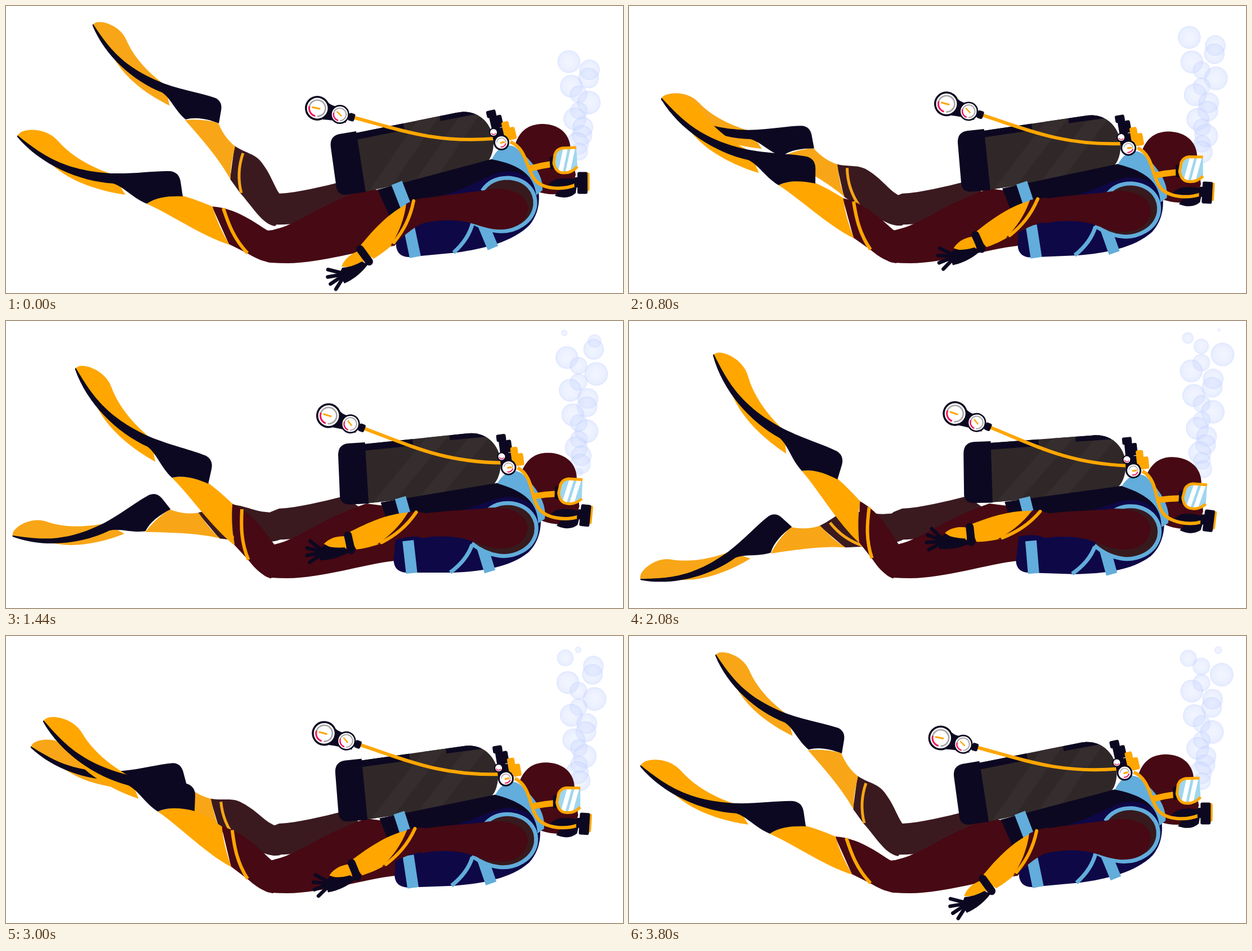
An HTML page with a canvas that plays this animation: 1096x511 px, repeating every 3.84 s.

```html
<!DOCTYPE html>
<html lang="en">
<head>
<meta charset="utf-8">
<title>Diver</title>
<style>
html, body { margin: 0; width: 100%; height: 100%; overflow: hidden; background: #fff; }
canvas { display: block; width: 100%; height: 100%; }
</style>
</head>
<body>
<canvas id="stage" width="1096" height="511"></canvas>
<script>
const ctx = document.getElementById('stage').getContext('2d');
const LOOP = 3840, PEAK = 1980, STEP = 40, RAD = Math.PI / 180;
const YELLOW = '#ffa600', INK = '#0d0821', SUIT = '#470914', FAR_SUIT = '#3b1a1f',
  FAR_YELLOW = '#f8a617', NAVY = '#0e0847', BLUE = '#62addb', GREY = '#aaa5a5', RED = '#f0175c';

const cache = {};
const path = d => cache[d] || (cache[d] = new Path2D(d));
function fill(color, d) {
  ctx.fillStyle = color;
  ctx.fill(path(d));
}
function line(color, width, d) {
  ctx.strokeStyle = color;
  ctx.lineWidth = width;
  ctx.stroke(path(d));
}
function disc(color, x, y, r) {
  ctx.fillStyle = color;
  ctx.beginPath();
  ctx.arc(x, y, r, 0, Math.PI * 2);
  ctx.fill();
}
function arc(color, width, x, y, r, from, to) {
  ctx.strokeStyle = color;
  ctx.lineWidth = width;
  ctx.beginPath();
  ctx.arc(x, y, r, from * RAD, to * RAD);
  ctx.stroke();
}
function turned(x, y, degrees, draw, scale = 1) {
  ctx.save();
  ctx.translate(x, y);
  ctx.rotate(degrees * RAD);
  ctx.scale(scale, scale);
  ctx.translate(-x, -y);
  draw();
  ctx.restore();
}
function clipped(d, draw) {
  ctx.save();
  ctx.clip(path(d));
  draw();
  ctx.restore();
}
function block(color, x, y, w, h, tilt = 0) {
  turned(x, y, tilt, () => {
    ctx.fillStyle = color;
    ctx.beginPath();
    ctx.roundRect(x - w / 2, y - h / 2, w, h, 3);
    ctx.fill();
  });
}

// One bubble every quarter second or so; each rises evenly and drifts to its side.
function bubbles(seconds) {
  const every = .27, speed = 54;
  for (let i = -12; i * every < seconds; i++) {
    const age = seconds - i * every;
    const side = Math.cos(i * 2 * Math.PI / 3.5);
    const x = 1018 + (5 + 28 * side) * age / 3.6;
    const y = 274 - speed * age;
    const size = Math.min(1, age / .25, (y - 10) / 40);
    if (size <= 0) continue;
    const r = (14 + 7 * Math.abs(side)) * size;
    const shade = ctx.createRadialGradient(x, y, r * .2, x, y, r);
    shade.addColorStop(0, 'rgba(212,223,255,.34)');
    shade.addColorStop(.75, 'rgba(203,216,255,.4)');
    shade.addColorStop(1, 'rgba(188,204,255,.48)');
    disc(shade, x, y, r);
  }
}

// Both legs wear the same fin, drawn with its tip at the origin.
function fin(x, y, tilt, scale, color) {
  ctx.save();
  ctx.translate(x, y);
  turned(0, 0, tilt, () => {
    fill(color, 'M0,0C3,-14 49,-17 71,9C99,41 139,59 169,69L191,105C149,99 109,86 79,66C49,44 19,19 0,0Z');
    fill(INK, 'M-1,-1C41,32 79,62 167,67C209,68 244,62 271,63Q286,65 289,81L293,108C269,107 247,109 229,121C204,111 189,91 169,85C109,81 41,52 -1,2Z');
  }, scale);
  ctx.restore();
}
function farShin() {
  fill(FAR_SUIT, 'M406,249C425,262 440,262 452,276C470,298 475,318 485,333L505,360L478,392C455,388 440,360 416,333L398,308Z');
  fill(FAR_YELLOW, 'M318,203C340,201 358,203 377,208C385,228 395,240 407,250C403,268 398,290 399,309C380,275 355,245 318,203Z');
  line(FAR_YELLOW, 5, 'M421,262C413,285 412,310 418,333');
  fin(155, 33, 18, .91, FAR_YELLOW);
}
function nearShin() {
  fill(SUIT, 'M366,357C410,360 440,385 467,401L490,430L478,457C460,457 445,450 430,441L396,424Z');
  fill(YELLOW, 'M250,352C268,340 290,337 314,338C335,344 350,350 367,357C373,380 385,405 397,425C345,408 300,375 250,352Z');
  line(YELLOW, 6, 'M386,360C395,388 405,415 429,440');
  fin(21, 231, 0, 1, YELLOW);
}

function tank() {
  const shell = 'M622,226L800,190C835,182 862,205 866,238C867,265 858,281 840,287L636,331Z';
  fill('#302828', shell);
  clipped(shell, () => {
    line('#352d2e', 28, 'M760,185L655,340M840,170L735,325');
    line(INK, 20, 'M622,228L706,211M770,195L832,183');
  });
  fill(INK, 'M592,228L622,223L639,331L604,336Q590,337 587,324L577,252Q574,232 592,228Z');
}

function dial(x, y, r) {
  disc(INK, x, y, r);
  disc('#fff', x, y, r * .84);
  arc(GREY, r * .12, x, y, r * .66, 190, 450);
  arc(RED, r * .14, x, y, r * .66, 105, 195);
  turned(x, y, r < 20 ? 45 : 12, () => line(YELLOW, r * .14, `M${x - r * .45},${y}L${x + r * .25},${y}`));
}

function gear() {
  line(YELLOW, 6, 'M612,197C700,220 760,245 868,236');
  fill(INK, 'M565,165Q580,183 596,177L604,208Q580,203 562,202Z');
  block(INK, 614, 198, 11, 14, 15);
  dial(553, 182, 22);
  dial(593, 193, 17);

  block(INK, 862, 192, 17, 13, -13);
  block(INK, 868, 208, 15, 24, -13);
  block(INK, 877, 205, 10, 22, -13);
  block(INK, 876, 229, 24, 23, -10);
  block(YELLOW, 889, 220, 13, 29, -13);
  block(YELLOW, 898, 227, 15, 22, -13);
  disc(INK, 866, 225, 8);
  disc('#fff', 866, 225, 6);
  arc(RED, 1.5, 866, 225, 4, 20, 160);
  disc(INK, 880, 243, 14);
  disc('#fff', 880, 243, 11);
  arc(GREY, 1.5, 880, 243, 8, 180, 360);
  arc(RED, 2, 880, 243, 8, 10, 100);
  line(YELLOW, 3, 'M878,244L886,242');
}

function head() {
  fill(SUIT, 'M905,245C915,216 935,210 955,210C985,211 1003,230 1003,257L1012,300L1005,330C980,338 960,336 942,330C935,300 920,265 905,245Z');
  fill(INK, 'M976,309Q995,304 1016,309L1012,333Q998,346 975,338L981,328L958,326Q966,312 976,309Z');
  fill(BLUE, 'M863,273C872,253 888,243 904,251C932,272 955,300 953,328L942,337C938,302 915,283 863,273Z');
  line(YELLOW, 11, 'M928,290Q950,284 972,281');
  block(INK, 971, 279, 10, 23, -4);
  const mask = 'M1013,252L988,253Q978,255 975,264L973,280Q977,297 990,297Q1004,298 1015,286';
  fill('#9fd6ee', mask);
  clipped(mask, () => line('#fff', 8, 'M995,248L984,300M1008,248L997,300'));
  line(YELLOW, 5, mask);
  line(YELLOW, 6, 'M896,242C925,253 925,293 940,310C955,327 990,328 1013,318');
  block(YELLOW, 1031, 313, 11, 33);
  block(INK, 1024, 315, 18, 39);
  block(INK, 1014, 314, 9, 18);
}

function torso() {
  tank();
  fill(NAVY, 'M692,340L693,428Q696,447 716,447L800,439C850,432 900,420 930,390C953,362 950,325 935,290L870,280Z');
  fill(INK, 'M660,327L865,272C905,265 937,282 944,318C925,298 900,292 880,296C845,304 825,328 735,348L683,378Z');
  line(BLUE, 20, 'M694,315L710,356M715,390L727,447M848,390L865,431');
  line(BLUE, 7, 'M829,386Q822,415 795,439');
  const armhole = 'M846,329C855,315 870,306 892,306C925,308 942,330 940,355C936,385 905,402 878,401C855,400 840,392 828,384';
  fill('#371a1e', armhole);
  line(BLUE, 7, armhole);
  head();
  gear();
}

function upperArm() {
  fill(SUIT, 'M722,347C760,338 805,334 845,329C880,320 922,328 927,356C928,386 902,399 874,398C850,397 835,387 810,383C785,380 760,382 740,387Z');
}
function foreArm() {
  fill(YELLOW, 'M626,431C655,395 685,362 727,346L735,380C705,403 690,428 653,450Z');
  fill(SUIT, 'M711,352Q725,344 745,341L752,384C725,388 708,412 683,427C697,405 707,382 711,352Z');
  line(YELLOW, 6, 'M724,347C718,378 706,400 689,421');
  fill(YELLOW, 'M596,464C602,448 615,440 627,436L636,456L622,466Z');
  line(INK, 14, 'M629,433L645,455');
  fill(INK, 'M597,466Q615,465 632,455L643,460C628,480 612,489 601,494L592,478Z');
  for (let finger = 0; finger < 4; finger++) {
    turned(603, 477, 194 - 24 * finger, () => line(INK, 6.5, 'M603,477L635,477'));
  }
}

function draw(ms) {
  const linear = ms < PEAK ? ms / PEAK : (LOOP - ms) / (LOOP - PEAK);
  const eased = (1 - Math.cos(Math.PI * linear)) / 2;
  ctx.fillStyle = '#fff';
  ctx.fillRect(0, 0, 1096, 511);
  ctx.lineCap = 'butt';
  bubbles(ms / 1000);

  fill(FAR_SUIT, 'M470,340L485,334C520,332 560,322 600,312L640,340L560,375C530,387 500,390 478,389C455,385 455,350 470,340Z');
  turned(478, 369, -57.7 * eased, farShin);
  fill(SUIT, 'M455,398Q467,402 480,397C520,388 560,352 640,325L720,335L715,400L690,427C640,432 560,458 500,458Q485,458 470,457A20,20 0 0 1 452,430Z');
  turned(470, 437, 25.3 * eased, nearShin);
  turned(703, 382, 7.6 * linear, torso);
  turned(742, 355, 4 * linear, upperArm);
  ctx.lineCap = 'round';
  turned(742, 355, 31 * (.7 * linear + .3 * eased), foreArm);
}

function tick() {
  const ms = performance.now() % LOOP;
  draw(Math.floor(ms / STEP) * STEP);
  requestAnimationFrame(tick);
}
tick();
</script>
</body>
</html>
```
